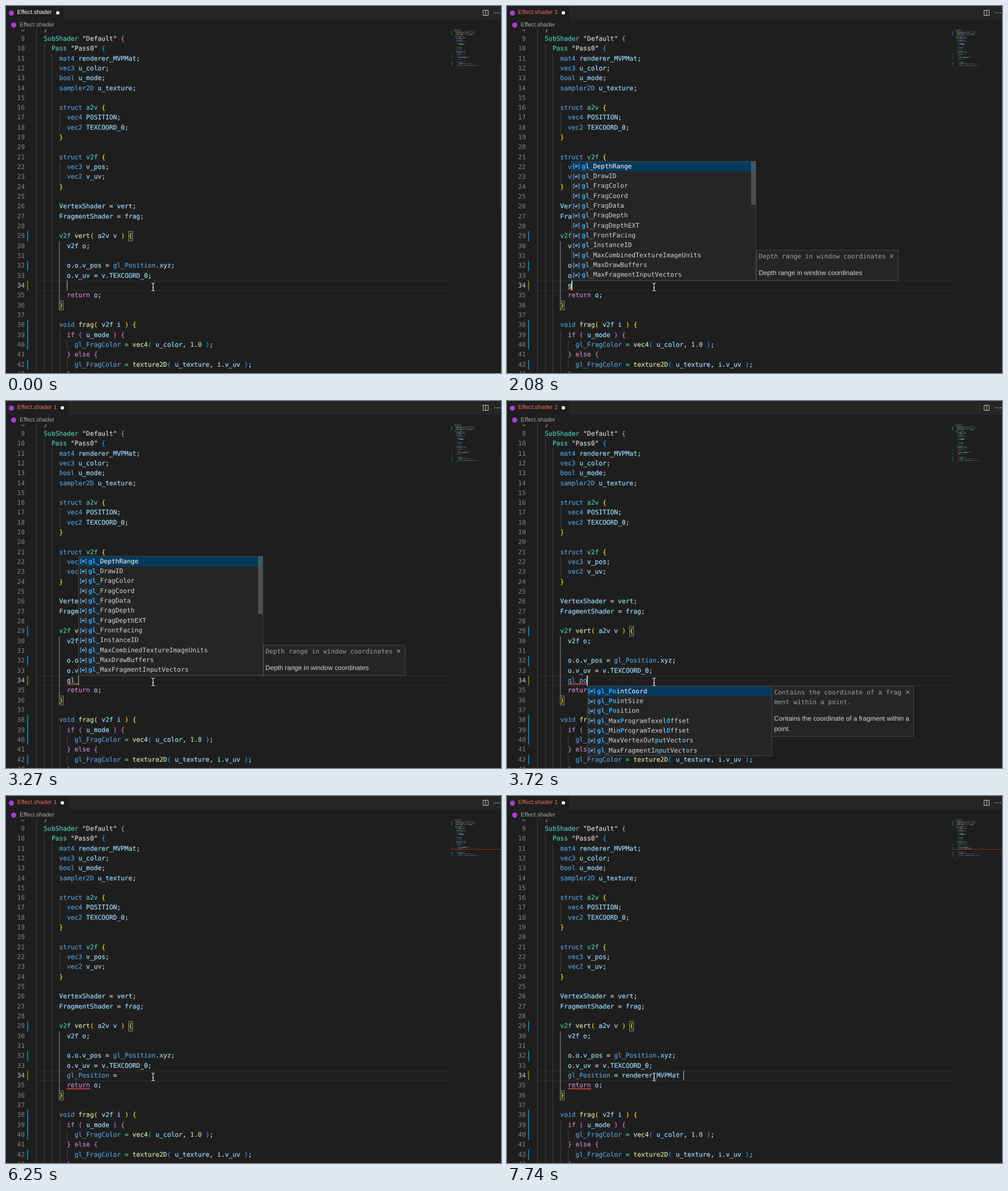
An HTML page for the animation above (8 s loop, 870 by 644 pixels).

```html
<!DOCTYPE html>
<html lang="en">
<head>
<meta charset="utf-8">
<title>Shader completion</title>
<style>
html, body { margin: 0; width: 100%; height: 100%; overflow: hidden; background: #1e1e1e; }
#stage { position: absolute; left: 0; top: 0; width: 870px; height: 644px; overflow: hidden; background: #1e1e1e;
  font: 11.25px/17.33px "DejaVu Sans Mono", monospace; color: #d4d4d4; white-space: pre; text-rendering: geometricPrecision; }
#stage div, #stage svg { position: absolute; }
.ui { font-family: "Liberation Sans", sans-serif; font-size: 10.4px; line-height: 14px; }
#bar { left: 0; top: 0; width: 870px; height: 24px; background: #252526; }
#tab { left: 0; top: 0; width: 101px; height: 24px; background: #1e1e1e; color: #fff; }
#tab.bad { width: 110px; color: #f26d5f; }
#tab .ui { left: 19.5px; top: 5px; }
#dot { left: 88px; top: 9px; width: 6.4px; height: 6.4px; border-radius: 50%; background: #fff; }
.bad #dot { left: 96px; }
.mark { width: 9px; height: 9px; border-radius: 50%; background: #a93fd0; }
#view { left: 0; top: 41px; width: 870px; height: 603px; overflow: hidden; }
#page { left: 0; top: -41px; }
#under, #marks, #popup { left: 0; top: 0; width: 870px; height: 644px; }
#code { -webkit-text-stroke: .2px; }
.num { width: 33px; left: 0; text-align: right; color: #858585; }
.now { color: #c6c6c6; }
.guide { left: 52.8px; height: 17.4px; background: repeating-linear-gradient(90deg, #404040 0 1px, transparent 1px 13.546px); }
#map { left: 786.8px; top: 41.2px; transform-origin: 0 0; transform: scale(.1137, .0887); -webkit-text-stroke: 1px; }
.match { width: 5.8px; height: 15.6px; border: 1px solid #888; background: rgba(0, 100, 0, .1); }
#caret { width: 1.6px; height: 17.4px; background: #c4c5c3; }
#list, #doc { border: 1px solid #454545; background: #252526; box-sizing: border-box; }
#list { width: 325px; }
#doc { width: 250px; }
.row { left: 0; width: 323px; height: 17.33px; }
.row.sel { background: #04395e; color: #fff; }
.row span { position: absolute; left: 16.8px; }
.row b { color: #2aaaff; }
.row svg { left: 1.5px; top: 3.5px; }
#slider { right: 0; top: 0; width: 8px; background: rgba(121, 121, 121, .5); }
#doc p { margin: 0 0 0 3.5px; }
#doc .head { padding-top: 2px; width: 227px; color: #a0a0a0; white-space: normal; word-break: break-all; }
#doc .body { margin-top: 12px; padding-bottom: 3.5px; width: 242px; white-space: normal; font: 11.65px/17.33px "Liberation Sans", sans-serif; }
</style>
</head>
<body>
<div id="stage">
  <div id="bar"></div>
  <div id="tab"><div class="mark" style="left:4.5px;top:7.5px"></div><div class="ui" id="title"></div><div id="dot"></div></div>
  <svg width="40" height="24" style="left:830px;top:0" fill="none" stroke="#c5c5c5">
    <path d="M8.5 7.5h9v9h-9zM13 7.5v9"/>
    <path d="M28.5 12h1.7m2.3 0h1.7m2.3 0h1.7" stroke-width="1.7"/>
  </svg>
  <div class="mark" style="left:9px;top:29px"></div>
  <div class="ui" style="left:24px;top:26.5px;color:#a9a9a9">Effect.shader</div>
  <div id="view"><div id="page">
    <div style="left:53px;top:482px;width:730px;height:15.5px;border:solid #2d2d2d;border-width:1px 0"></div>
    <div id="under"></div>
    <div id="code"></div>
    <svg id="wave" width="870" height="644" style="left:0;top:0" fill="none" stroke="#f14c4c" stroke-width="1.2"><path/></svg>
    <div id="caret"></div>
  </div></div>
  <div id="map"></div>
  <div id="marks"></div>
  <div id="error" style="background:rgba(235,50,50,.6);height:1.4px"></div>
  <div style="left:869px;top:96px;width:1px;height:264px;background:#3a3a3a"></div>
  <div id="popup"></div>
  <svg width="12" height="18" style="left:252.5px;top:484px" fill="none">
    <defs><path id="beam" d="M2.5 2Q5.5 2 5.5 4.5Q5.5 2 8.5 2M5.5 4V14M2.5 16Q5.5 16 5.5 13.5Q5.5 16 8.5 16M4 10.5H7"/></defs>
    <use href="#beam" stroke="#111" stroke-width="3"/>
    <use href="#beam" stroke="#eee" stroke-width="1.2"/>
  </svg>
</div>
<script>
const CH = 6.773, LH = 17.33, LEFT = 52.8, EDIT = 34;
const $ = id => document.getElementById(id);
const top_ = n => 482.1 + (n - EDIT) * LH;
const colX = c => LEFT + c * CH;
const box = (x, y, w, h, css) => `<div style="left:${x}px;top:${y}px;width:${w}px;height:${h}px;${css}"></div>`;

const lines = `Shader "Effect" {
  Properties {
    u_color( "Color", vec3 ) = ( 1.0, 1.0, 1.0 )
    u_mode( "Mode", bool ) = false
    u_texture( "Texture", sampler2D ) = "white" {}
    u_scale( "Scale", vec2 ) = ( 1.0, 1.0 )
    u_offset( "Offset", vec2 ) = ( 0.0, 0.0 )
  }
  SubShader "Default" {
    Pass "Pass0" {
      mat4 renderer_MVPMat;
      vec3 u_color;
      bool u_mode;
      sampler2D u_texture;

      struct a2v {
        vec4 POSITION;
        vec2 TEXCOORD_0;
      }

      struct v2f {
        vec3 v_pos;
        vec2 v_uv;
      }

      VertexShader = vert;
      FragmentShader = frag;

      v2f vert( a2v v ) {
        v2f o;

        o.o.v_pos = gl_Position.xyz;
        o.v_uv = v.TEXCOORD_0;

        return o;
      }

      void frag( v2f i ) {
        if ( u_mode ) {
          gl_FragColor = vec4( u_color, 1.0 );
        } else {
          gl_FragColor = texture2D( u_texture, i.v_uv );
        }
      }
    }
  }
}`.split('\n');

const rules = [
  [/^"/, '#d4d4d4'],
  [/^(return|if|else)$/, '#c586c0'],
  [/^(SubShader|Pass|Shader|Properties)$/, '#4ec9b0'],
  [/^\d/, '#b5cea8']
];
const bracketColors = ['#ffd700', '#da70d6', '#179fff'];

function wordColor(word, before, after) {
  const rule = rules.find(r => r[0].test(word));
  if (rule) return rule[1];
  if (/struct $/.test(before)) return '#4ec9b0';
  if (/^\(/.test(after)) return '#dcdcaa';
  if (/^(mat4|vec\d|bool|sampler2D|struct|void|gl_\w+)$/.test(word)) return '#569cd6';
  if (/^ \w+\(/.test(after)) return '#4ec9b0';
  return /^\w/.test(word) ? '#9cdcfe' : '#d4d4d4';
}

function highlight(all) {
  let depth = 0;
  return all.map((line, i) => {
    const html = line.replace(/"[^"]*"|\d[\d.]*|\w+|[{}()]|[^\s\w]/g, (tok, at) => {
      let color;
      if (/^[{(]/.test(tok)) color = bracketColors[depth++ % 3];
      else if (/^[})]/.test(tok)) color = bracketColors[--depth % 3];
      else color = wordColor(tok, line.slice(0, at), line.slice(at + tok.length));
      return `<span style="color:${color}">${tok}</span>`;
    });
    return `<div style="top:${i * LH}px">${html}</div>`;
  }).join('');
}

// Line numbers, indent guides, change bars and bracket boxes
const BLUE = 'background:#0c7d9d', GREEN = 'background:#587c0c';
const changed = [29, 32, 38, 39, 40, 42];
function drawUnder() {
  let html = '';
  for (let n = 8; n <= 43; n++) {
    const next = lines.slice(n - 1).find(l => l.trim());
    const indent = next.search(/\S/);
    html += `<div class="num${n === EDIT ? ' now' : ''}" style="top:${top_(n)}px">${n}</div>`
      + `<div class="guide" style="top:${top_(n)}px;width:${indent * CH - 2}px"></div>`;
  }
  for (const n of [...changed, EDIT]) html += box(37, top_(n), 2.4, LH, n === EDIT ? GREEN : BLUE);
  html += box(colX(6), top_(30), 1, 6 * LH, 'background:#707070');
  for (const [n, c] of [[29, 24], [36, 6]])
    html += `<div class="match" style="left:${colX(c)}px;top:${top_(n)}px"></div>`;
  $('under').innerHTML = html;
  $('marks').innerHTML = [3, 4, 5, 6, 7, ...changed, EDIT]
    .map(n => box(783, 41.2 + (n - 1) * 1.537, 1.3, 1.54, n === EDIT ? GREEN : BLUE)).join('');
}

const glNames = ['DepthRange', 'DrawID', 'FragColor', 'FragCoord', 'FragData', 'FragDepth', 'FragDepthEXT', 'FrontFacing',
  'InstanceID', 'MaxCombinedTextureImageUnits', 'MaxDrawBuffers', 'MaxFragmentInputVectors'].map(s => 'gl_' + s);
const poNames = ['PointCoord', 'PointSize', 'Position', 'MaxProgramTexelOffset', 'MinProgramTexelOffset',
  'MaxVertexOutputVectors', 'MaxFragmentInputVectors'].map(s => 'gl_' + s);
const rNames = ['radians', 'reflect', 'refract', 'renderer_MVPMat', 'return', 'round', 'roundEven', 'gl_DepthRange',
  'gl_MaxDrawBuffers', 'gl_FragColor', 'gl_FragCoord', 'gl_FrontFacing'];
const renNames = ['renderer_MVPMat', 'return', 'roundEven', 'reflection', 'refraction'];
const lists = { g: [glNames, 76], gl: [glNames, 101], gl_: [glNames, 101], gl_po: [poNames],
  r: [rNames, 76], ren: [renNames], rend: [renNames.slice(0, 1)] };
const docs = {
  gl_DepthRange: 'Depth range in window coordinates',
  gl_PointCoord: 'Contains the coordinate of a fragment within a point.',
  gl_PointSize: 'Contains size of rasterized points, in pixels.',
  gl_Position: 'Contains the position of the current vertex.'
};
const icon = `<svg width="12" height="11" fill="none" stroke="#75beff"><path d="M3 1.5H1V9H3M9 1.5H11V9H9M3.5 5L7 3.2L8.5 5L5 7.2ZM3.5 5L5.3 5.6L8.5 5"/></svg>`;

// Prefers the next letter, then a capital, then any later letter
function markMatch(name, query) {
  const hits = new Set();
  let i = 0;
  for (const c of query) {
    if (name[i]?.toLowerCase() !== c) {
      const capital = name.indexOf(c.toUpperCase(), i);
      i = capital >= 0 ? capital : name.toLowerCase().indexOf(c, i);
    }
    if (i < 0) break;
    hits.add(i++);
  }
  return [...name].map((c, k) => hits.has(k) ? `<b>${c}</b>` : c).join('');
}

function popupHtml(query, sel, x) {
  if (!lists[query]) return '';
  const [names, slider] = lists[query];
  const height = names.length * LH + 2;
  const above = names.length > 8;
  const y = above ? 481.8 - height : 499.8;
  const rows = names.map((name, i) =>
    `<div class="row${i === sel ? ' sel' : ''}" style="top:${i * LH}px">${icon}<span>${markMatch(name, query)}</span></div>`).join('');
  const bar = slider ? `<div id="slider" style="height:${slider}px"></div>` : '';
  let html = `<div id="list" style="left:${x}px;top:${y}px;height:${height}px">${rows}${bar}</div>`;
  const text = docs[names[sel]];
  if (text) {
    const place = above ? `bottom:${644 - 481.8}px` : `top:${y}px`;
    html += `<div id="doc" style="left:${x + 324.5}px;${place}"><p class="head">${text}</p><p class="body">${text}</p>`
      + `<svg width="8" height="8" style="right:6.5px;top:6px" stroke="#c5c5c5"><path d="M1 1L7 7M7 1L1 7"/></svg></div>`;
  }
  return html;
}

function wavePath(x, end, y) {
  let d = `M${x} ${y + 2}`;
  for (let up = true; x < end; up = !up) {
    x = Math.min(x + 2.6, end);
    d += `L${x} ${y + (up ? 0 : 2)}`;
  }
  return d;
}

// time, typed text, caret shown, selected row
const POS = 'gl_Position', MVP = POS + ' = renderer_MVPMat';
const steps = [
  [0, '', 1], [450, '', 0], [900, '', 1],
  [1190, 'g', 1], [1630, 'g', 0], [2080, 'g', 1],
  [2680, 'gl', 1], [3120, 'gl', 0], [3270, 'gl_', 1],
  [3720, 'gl_po', 1], [4310, 'gl_po', 0], [4460, 'gl_po', 0, 1], [4760, 'gl_po', 1, 2],
  [4910, POS, 1], [5050, POS, 1], [5500, POS + ' ', 1],
  [5650, POS + ' = ', 1], [6250, POS + ' = ', 0],
  [6700, POS + ' = r', 1], [6850, POS + ' = ren', 1], [6990, POS + ' = rend', 1],
  [7590, MVP, 1], [7740, MVP + ' ', 1]
];

function render([time, text, caret, sel = 0]) {
  const all = lines.slice();
  all[EDIT - 1] = ' '.repeat(8) + text;
  $('code').innerHTML = $('map').innerHTML = highlight(all);

  const x = colX(8 + text.length);
  $('caret').style.left = x - 0.4 + 'px';
  $('caret').style.visibility = caret ? 'visible' : 'hidden';
  $('tab').className = text ? 'bad' : '';
  $('title').textContent = text ? 'Effect.shader 1' : 'Effect.shader';

  // The error sits on the typed word, later on the line below
  const below = time >= 5650;
  const count = below ? 6 : time < 5050 ? Math.min(text.length, 5) : 0;
  const errorLine = below ? EDIT + 1 : EDIT;
  $('wave').firstElementChild.setAttribute('d', count ? wavePath(colX(8), colX(8 + count), top_(errorLine) + 13.4) : '');
  const error = $('error').style;
  error.left = (below ? 783 : 792.9) + 'px';
  error.top = (below ? 92.9 : 91.8) + 'px';
  error.width = (below ? 86 : count * 0.77) + 'px';

  $('popup').innerHTML = popupHtml(text.replace(POS + ' = ', ''), sel, x - 0.3);
}

$('code').style.left = LEFT + 'px';
$('code').style.top = top_(1) + 'px';
$('caret').style.top = top_(EDIT) + 'px';
drawUnder();

const start = performance.now();
let shown = null;
function tick() {
  const t = (performance.now() - start) % 8000;
  const step = steps.findLast(s => s[0] <= t);
  if (step !== shown) render(shown = step);
  requestAnimationFrame(tick);
}
tick();
</script>
</body>
</html>
```
